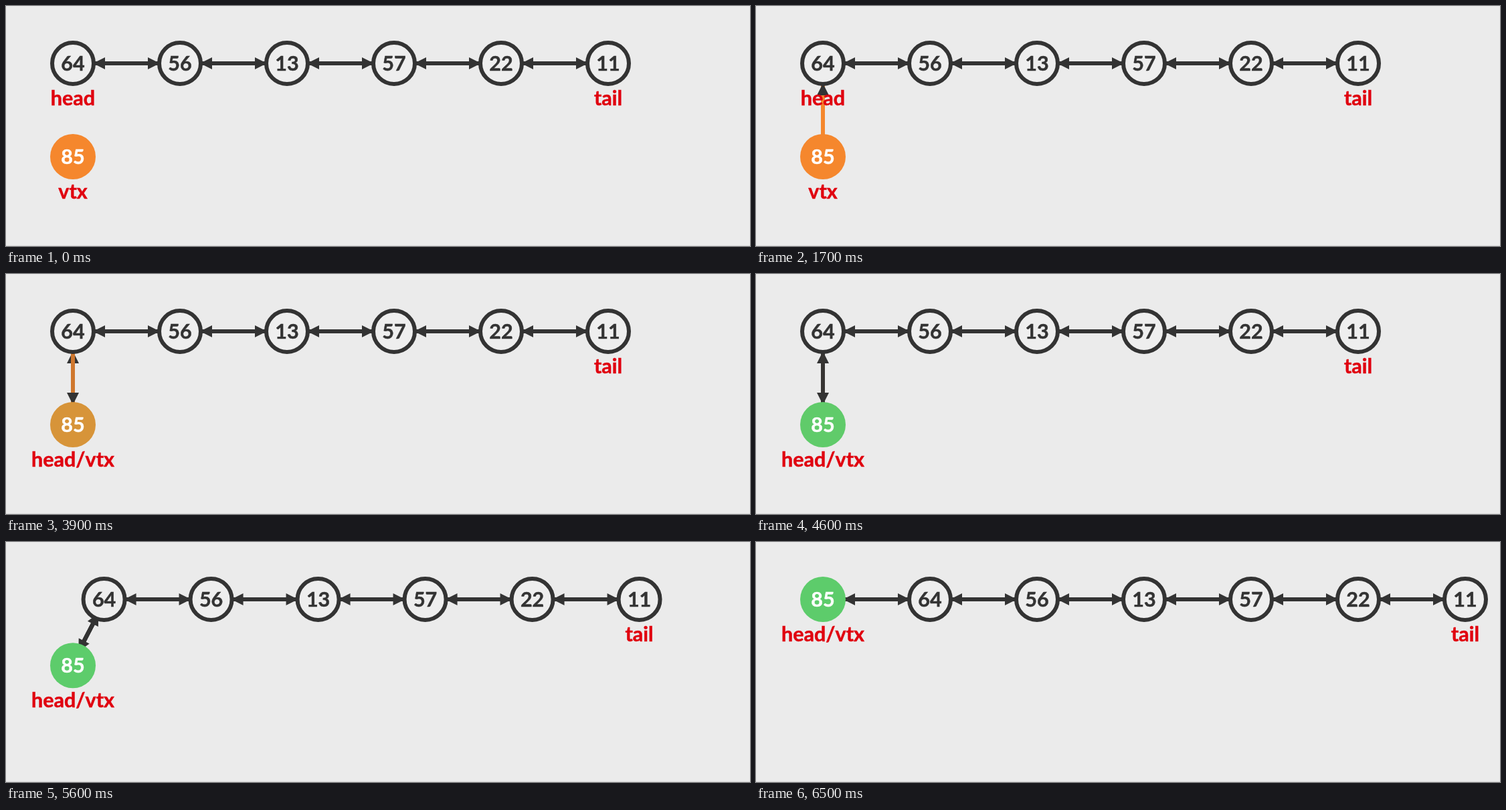
Animation of 1112x360 px, one loop 8000 ms. Source, as an HTML page with a canvas:

```html
<!DOCTYPE html>
<html lang="en">
<head>
<meta charset="utf-8">
<title>Insert at the head of a doubly linked list</title>
<style>
  html, body { margin: 0; width: 100%; height: 100%; overflow: hidden; background: #ebebeb; }
  canvas { display: block; }
</style>
</head>
<body>
<canvas id="stage" width="1112" height="360"></canvas>
<script>
const ctx = document.getElementById('stage').getContext('2d');
const LOOP = 8000, STEP = 100;
const DARK = '#333', RED = '#e0000f';
const ORANGE = [245, 135, 45], GREEN = [93, 204, 107], INK = [51, 51, 51];
const VALUES = [64, 56, 13, 57, 22, 11];
const LEFT = 100, TOP = 86, GAP = 160, DROP = 140;
const RADIUS = 34, REACH = 32;

const clamp = v => Math.min(1, Math.max(0, v));
const ease = t => t < .5 ? 4 * t ** 3 : 1 - 4 * (1 - t) ** 3;
const progress = (time, start, length) => ease(clamp((time - start) / length));
const mix = (a, b, p) => `rgb(${a.map((v, i) => Math.round(v + (b[i] - v) * p))})`;

// Eased shift into the row, with a slightly uneven clock
function shiftAt(time) {
  const clock = [[4908, 0], [5200, .184], [5600, .4175], [6000, .6876], [6500, 1]];
  if (time <= clock[0][0]) return 0;
  const i = clock.findIndex(k => time < k[0]);
  if (i < 0) return 1;
  const [t0, p0] = clock[i - 1], [t1, p1] = clock[i];
  return ease(p0 + (p1 - p0) * (time - t0) / (t1 - t0));
}

function line(x1, y1, x2, y2, color) {
  ctx.strokeStyle = color;
  ctx.lineWidth = 6;
  ctx.beginPath();
  ctx.moveTo(x1, y1);
  ctx.lineTo(x2, y2);
  ctx.stroke();
}

// Arrowhead with its tip at the second point
function arrow(x1, y1, x2, y2) {
  ctx.save();
  ctx.translate(x2, y2);
  ctx.rotate(Math.atan2(y2 - y1, x2 - x1));
  ctx.fillStyle = DARK;
  ctx.beginPath();
  ctx.moveTo(2, 0);
  ctx.lineTo(-16, -9);
  ctx.lineTo(-16, 9);
  ctx.fill();
  ctx.restore();
}

// Directed edge, with a coloured trace running over it up to `done`
function edge(x1, y1, x2, y2, color = DARK, done = 0) {
  line(x1, y1, x2, y2, DARK);
  if (done) line(x1, y1, x1 + (x2 - x1) * done, y1 + (y2 - y1) * done, color);
  arrow(x1, y1, x2, y2);
}

function text(str, x, y, color) {
  ctx.font = 'bold 30.5px "PT Sans", Lato, sans-serif';
  ctx.textAlign = 'center';
  ctx.fillStyle = ctx.strokeStyle = color;
  ctx.lineWidth = .5;
  ctx.fillText(str, x, y);
  ctx.strokeText(str, x, y);
}

const label = (str, x, y) => text(str, x, y + 63, RED);

function node(value, x, y, fill) {
  ctx.beginPath();
  ctx.arc(x, y, fill ? RADIUS : RADIUS - 3, 0, 7);
  ctx.fillStyle = fill || '#eee';
  ctx.fill();
  if (!fill) {
    ctx.strokeStyle = DARK;
    ctx.lineWidth = 6;
    ctx.stroke();
  }
  text(value, x, y + 11, fill ? '#fff' : DARK);
}

function draw(time) {
  const shift = shiftAt(time);
  const recolor = progress(time, 3352, 1500);
  const merged = time >= 3400;
  const headX = LEFT + GAP * shift;
  const newY = TOP + DROP * (1 - shift);
  const tailX = headX + GAP * (VALUES.length - 1);

  ctx.fillStyle = '#ebebeb';
  ctx.fillRect(0, 0, 1112, 360);
  ctx.fillStyle = '#dcdcdc';
  ctx.fillRect(0, 359, 1112, 1);

  for (let i = 1; i < VALUES.length; i++) {
    const a = headX + GAP * (i - 1) + REACH, b = headX + GAP * i - REACH;
    edge(a, TOP, b, TOP);
    edge(b, TOP, a, TOP);
  }

  // The ends of the new edges slide from vertical to horizontal contact
  const dx = REACH * shift, dy = REACH * (1 - shift);
  const from = [LEFT + dx, newY - dy], to = [headX - dx, TOP + dy];
  const trace = mix(ORANGE, INK, recolor);
  if (time >= 500) edge(...from, ...to, trace, progress(time, 450, 1500));
  if (time >= 2100) edge(...to, ...from, trace, progress(time, 2020, 1400));

  VALUES.forEach((v, i) => node(v, headX + GAP * i, TOP));
  node(85, LEFT, newY, mix(ORANGE, GREEN, recolor));

  if (!merged) label('head', headX, TOP);
  label('tail', tailX, TOP);
  label(merged ? 'head/vtx' : 'vtx', LEFT, newY);
}

const start = performance.now();
function tick() {
  const time = (performance.now() - start) % LOOP;
  draw(Math.floor(time / STEP) * STEP);
  requestAnimationFrame(tick);
}
tick();
</script>
</body>
</html>
```
